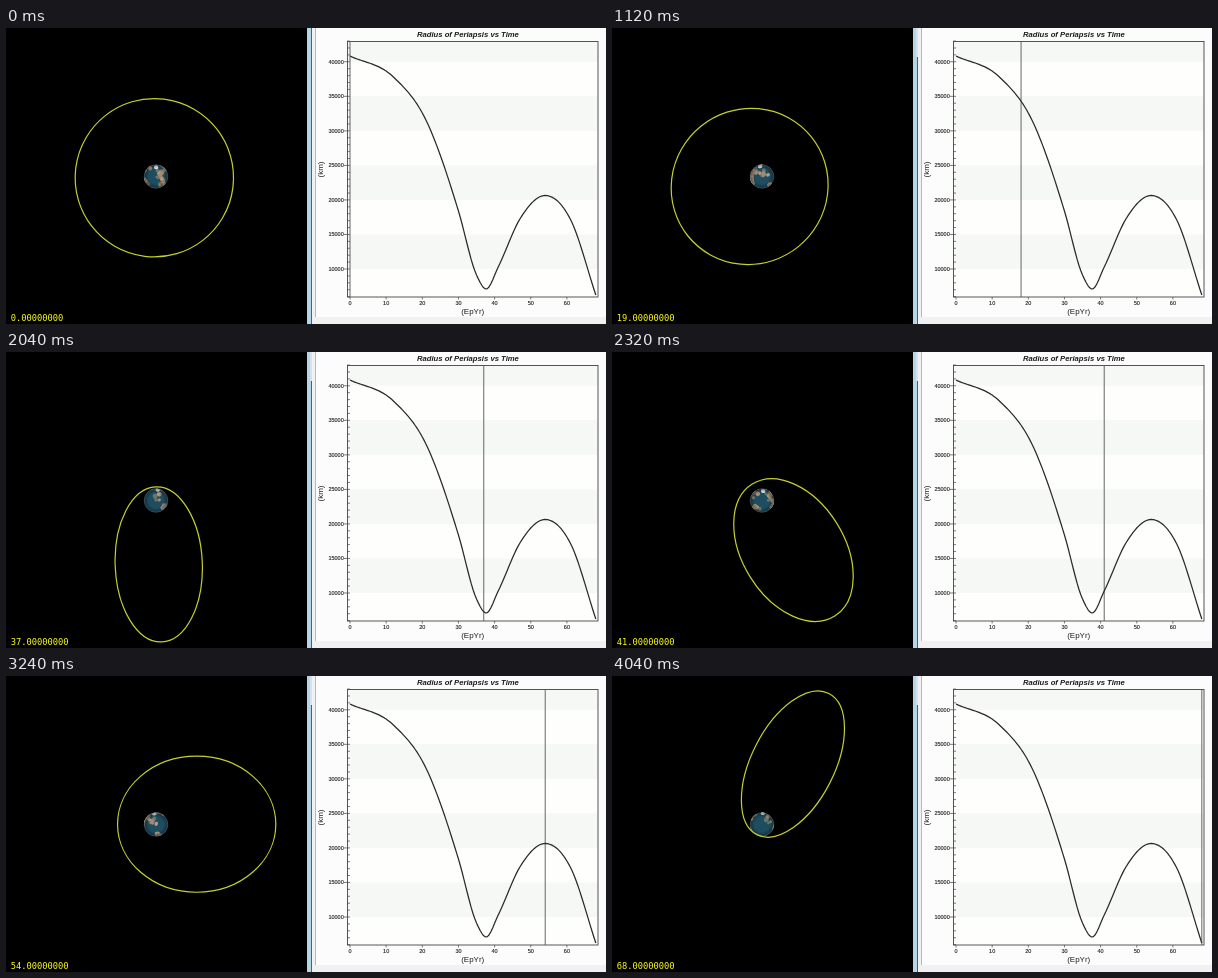
These frames come from a looping animation (600 px wide and 296 px high, 4120 ms). An HTML page:

```html
<!DOCTYPE html>
<html lang="en">
<head>
<meta charset="utf-8">
<title>Radius of Periapsis vs Time</title>
<style>
  html, body { margin: 0; width: 100%; height: 100%; overflow: hidden; background: #000; }
  svg { display: block; width: 600px; height: 296px; }
  text { font-family: "Liberation Sans", Arial, sans-serif; fill: #1c1c1c; }
  .tick { font-size: 5.5px; stroke: #1c1c1c; stroke-width: .12px; }
  .unit { font-size: 8px; text-anchor: middle; }
  .title { font-size: 7.7px; font-weight: bold; font-style: italic; text-anchor: middle; }
  .year { font: 8.75px "DejaVu Sans Mono", monospace; fill: #ffff10; }
</style>
</head>
<body>
<svg viewBox="0 0 600 296">
  <defs>
    <clipPath id="disc"><circle r="12"/></clipPath>
    <radialGradient id="shade">
      <stop offset=".6" stop-opacity="0"/>
      <stop offset="1" stop-opacity=".4"/>
    </radialGradient>
  </defs>

  <rect width="301" height="296"/>
  <g transform="translate(150 148.5)">
    <g clip-path="url(#disc)">
      <circle r="12" fill="#1e4d60"/>
      <g id="land"></g>
      <circle r="12" fill="url(#shade)"/>
    </g>
    <circle r="11.8" fill="none" stroke="#8a949a" stroke-width=".5" opacity=".6"/>
  </g>
  <g transform="translate(150.3 148.2)">
    <ellipse id="orbit" fill="none" stroke="#c6d02c" stroke-width="1.2"/>
  </g>
  <text id="year" class="year" x="4.7" y="293.4"></text>

  <g id="chart">
    <rect x="301" width="299" height="296" fill="#f1f1f1"/>
    <rect x="301" width="4" height="296" fill="#b4d6e8"/>
    <rect x="305" width="1" height="296" fill="#48606f"/>
    <rect id="notch" x="304" width="2" height="29" fill="#d3e2ec"/>
    <rect x="310" width="290" height="289" fill="#fcfcfc"/>
    <path d="M309.500 0V289" stroke="#b8b8b8"/>
    <rect x="341" y="13" width="251" height="256" fill="#fefefd"/>
  </g>
</svg>

<script>
const LOOP = 4120, RADIUS = 42164, KM = 0.006907, TILT = 0.54, RAD = Math.PI / 180;
const $ = id => document.getElementById(id);

function set(el, attrs) {
  for (const k in attrs) el.setAttribute(k, attrs[k]);
  return el;
}
function add(parent, tag, attrs, text = "") {
  const el = document.createElementNS("http://www.w3.org/2000/svg", tag);
  el.textContent = text;
  return parent.appendChild(set(el, attrs));
}

// Smooth cubic through [x, y] points, tangents from the neighbouring slopes.
function spline(pts) {
  const last = pts.length - 1;
  const width = i => pts[i + 1][0] - pts[i][0];
  const slope = i => (pts[i + 1][1] - pts[i][1]) / width(i);
  const tangent = i => {
    if (i === 0) return slope(0);
    if (i === last) return slope(last - 1);
    const a = width(i - 1), b = width(i);
    return (b * slope(i - 1) + a * slope(i)) / (a + b);
  };
  return x => {
    let i = 0;
    while (i < last - 1 && x > pts[i + 1][0]) i++;
    const h = width(i), t = (x - pts[i][0]) / h, s = 1 - t;
    return pts[i][1] * (1 + 2 * t) * s * s + pts[i + 1][1] * t * t * (3 - 2 * t)
      + h * t * s * (tangent(i) * s - tangent(i + 1) * t);
  };
}

const yearAt = spline([[0, 0], [5, 2], [11, 19], [16, 31], [23, 41], [32, 54], [40, 68]]);
const curveY = spline([[0, 28], [12, 49], [21, 92], [30, 183], [35, 247], [37.7, 261],
  [41, 239], [47, 191], [54.2, 167.5], [61, 191.5], [68, 267]]);
const heading = spline([[0, 142], [19, 141], [31, 130], [41, 58], [54, 0], [68, -63]]);
const semiMajor = year => 79.2 - 1.6 * Math.exp(-(((year - 37) / 10) ** 2));
const spin = year => 25 + 71 * year;

const px = year => 344 + 3.615 * year;
const py = km => 241 - (km - 10000) * KM;
const kmAt = year => 10000 + (241 - curveY(year)) / KM;

// Chart
const chart = $("chart");
for (let km = 10000; km <= 40000; km += 10000) {
  const top = py(Math.min(km + 5000, 43000));
  add(chart, "rect", { x: 342, y: top, width: 250, height: py(km) - top, fill: "#f5f8f5" });
}

let ticks = "";
for (let km = 6000; km <= 43000; km += 1000) {
  const major = km % 5000 === 0;
  ticks += `M${major ? 338 : 341} ${py(km)}H344`;
  if (major) add(chart, "text", { class: "tick", x: 337.7, y: py(km) + 2, "text-anchor": "end" }, km);
}
for (let yr = 0; yr <= 60; yr += 10) {
  ticks += `M${px(yr)} 269V271.5`;
  add(chart, "text", { class: "tick", x: px(yr), y: 277.2, "text-anchor": "middle" }, yr);
}
add(chart, "path", { d: ticks, stroke: "#444", "stroke-width": 0.7 });
add(chart, "rect", { x: 341.5, y: 13.5, width: 250.5, height: 255.5, fill: "none", stroke: "#444", "stroke-width": 0.9 });
add(chart, "text", { class: "title", x: 461.9, y: 9 }, "Radius of Periapsis vs Time");
add(chart, "text", { class: "unit", x: 466.7, y: 286.2 }, "(EpYr)");
add(chart, "text", { class: "unit", transform: "translate(316.7 141.5) rotate(-90)" }, "(km)");

const cursor = add(chart, "path", { stroke: "#555", "stroke-width": 0.9 });
let d = "";
for (let yr = 0; yr <= 68; yr += 0.5) d += (d ? "L" : "M") + px(yr) + " " + curveY(yr).toFixed(2);
add(chart, "path", { d, fill: "none", stroke: "#2a2a2a", "stroke-width": 1.25, "stroke-linejoin": "round" });

// Land: seeded patches scattered around [latitude, longitude, spread]
let seed = 7;
const random = () => (seed = seed * 16807 % 2147483647) / 2147483647;
const around = (mid, spread) => mid + (random() * 2 - 1) * spread;
const patches = [];
function scatter([lat, lon, spread], count, colours) {
  for (let i = 0; i < count; i++) patches.push({
    lat: around(lat, spread * 0.6), lon: around(lon, spread), size: 1.5 + random() * 1.5,
    el: add($("land"), "ellipse", { fill: colours[i % colours.length] })
  });
}
const continents = [[18, 15, 24], [-15, 24, 14], [48, 30, 24], [45, 95, 34], [-25, 134, 12], [48, -100, 26], [-12, -60, 18]];
for (const c of continents) scatter(c, 6, ["#b59a80", "#6c7468", "#a08a72"]);
scatter([84, 0, 8], 3, ["#e9eeee"]);

function turnGlobe(phase) {
  for (const { lat, lon, size, el } of patches) {
    const a = lat * RAD, b = (lon - 20 + phase) * RAD;
    const x = Math.cos(a) * Math.sin(b), y = Math.sin(a), z = Math.cos(a) * Math.cos(b);
    const up = y * Math.cos(TILT) - z * Math.sin(TILT);
    const near = y * Math.sin(TILT) + z * Math.cos(TILT);
    set(el, {
      rx: near > 0 ? size * (0.25 + 0.75 * near) : 0, ry: size * 0.8,
      transform: `translate(${12 * x} ${-12 * up}) rotate(${Math.atan2(-up, x) / RAD})`
    });
  }
}

function drawOrbit(year) {
  const a = semiMajor(year), e = 1 - kmAt(year) / RADIUS;
  set($("orbit"), { cx: a * e, rx: a, ry: a * Math.sqrt(1 - e * e), transform: `rotate(${heading(year)})` });
}

// Steps alternate between 120 and 80 ms after the first one.
function stepAt(t) {
  if (t < 120) return 0;
  const u = t - 120;
  return 1 + 2 * Math.floor(u / 200) + (u % 200 >= 120 ? 1 : 0);
}

function draw(step) {
  const year = Math.round(yearAt(step));
  // The chart cursor trails the counter by a year in the first half.
  const x = px(year > 0 && year < 36 ? year - 1 : year);
  $("year").textContent = year.toFixed(8);
  $("notch").style.display = step ? "" : "none";
  set(cursor, { d: `M${x} 13V269` });
  drawOrbit(year);
  turnGlobe(spin(year));
}

const start = performance.now();
let shown = -1;
function tick() {
  const step = stepAt((performance.now() - start) % LOOP);
  if (step !== shown) draw(shown = step);
  requestAnimationFrame(tick);
}
tick();
</script>
</body>
</html>
```
